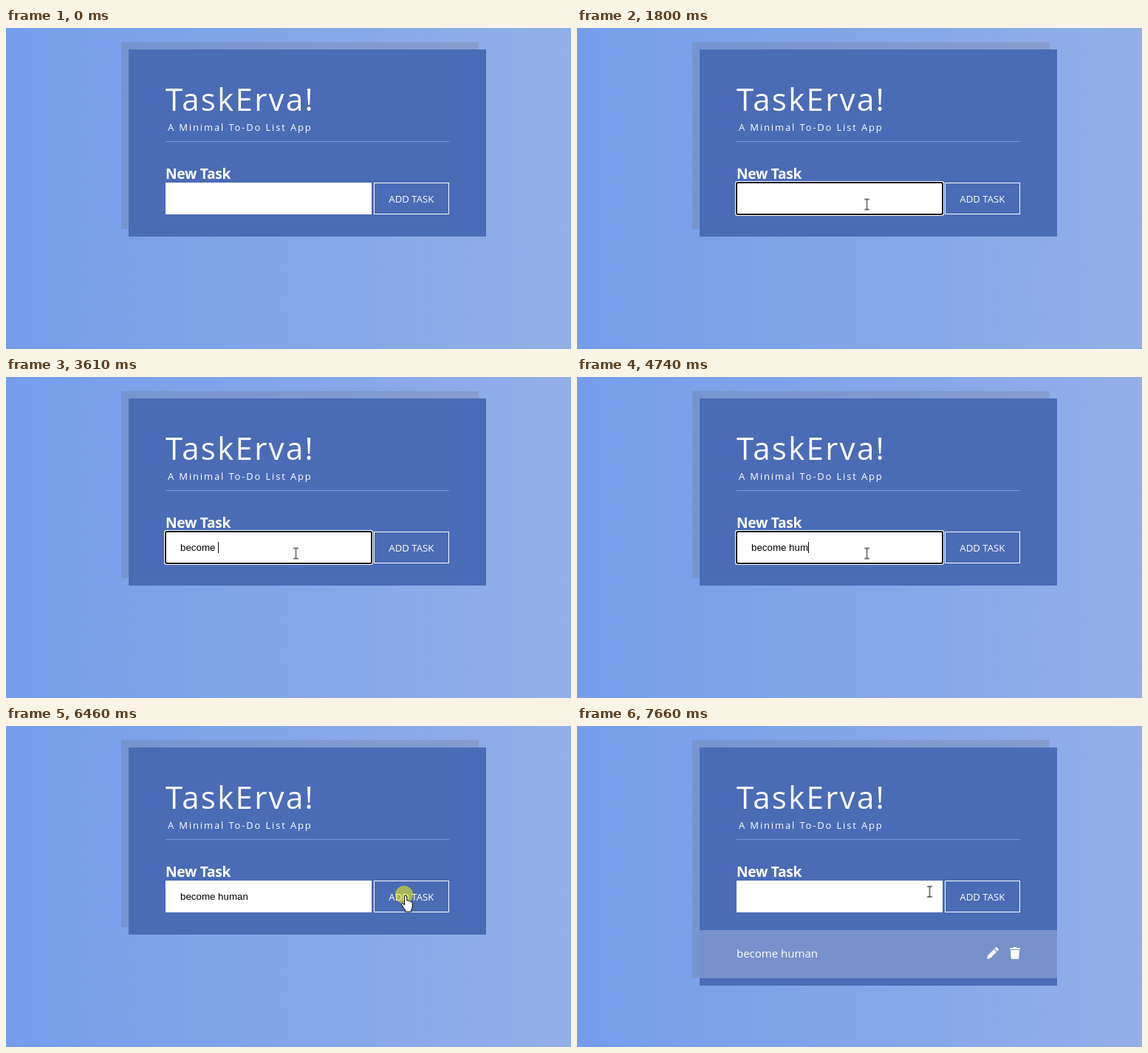
An HTML page for the animation above (8000 ms loop, 765 px wide and 434 px high).

```html
<!DOCTYPE html>
<html lang="en">
<head>
<meta charset="utf-8">
<title>To-do list</title>
<style>
  html, body { margin: 0; width: 100%; height: 100%; overflow: hidden; }
  svg { display: block; width: 765px; height: 434px; background: linear-gradient(to right, #759dea, #92afe7); }
  text { font-family: "Open Sans", "Noto Sans", sans-serif; fill: #fff; }
  .title { font-size: 42px; letter-spacing: 2.3px; }
  .tagline { font-size: 13px; letter-spacing: 1.85px; }
  .label { font-size: 19.2px; font-weight: 700; letter-spacing: -.3px; }
  .button { font-size: 13.2px; }
  .item { font-size: 15px; }
  .typed { font: 13.333px "Liberation Sans", Arial, sans-serif; fill: #000; }

  .focus, .typing, .caret, .added, .pointer, .arrow, .beam, .hand, .click {
    animation: 8s step-end infinite;
  }
  .focus { animation-name: focus; }
  .typing { animation-name: typing; }
  .caret { animation-name: caret; }
  .added { animation-name: added; }
  .pointer { animation-name: move; }
  .arrow { animation-name: arrow; }
  .beam { animation-name: beam; }
  .hand { animation-name: hand; }
  .click { animation-name: click; }

  @keyframes focus { 0%, 80.75% { opacity: 0 } 15% { opacity: 1 } }
  @keyframes added { 0% { opacity: 0 } 82.5%, 100% { opacity: 1 } }
  @keyframes click {
    0%, 16.625%, 82.5%, 100% { opacity: 0 }
    15%, 80.75% { opacity: 1 }
  }
  @keyframes caret {
    0%, 22.5%, 51.75%, 70%, 80.75%, 100% { opacity: 0 }
    15%, 28.25%, 53.375%, 76.625% { opacity: 1 }
  }
  /* the caret pushes a white cover off the text, one letter at a time */
  @keyframes typing {
    0% { transform: translateX(0) }
    28.25% { transform: translateX(7.4px) }
    31.625% { transform: translateX(14.8px) }
    34.125% { transform: translateX(21.5px) }
    36.625% { transform: translateX(28.9px) }
    40.25% { transform: translateX(40px) }
    42.625% { transform: translateX(47.4px) }
    45.125% { transform: translateX(51.1px) }
    53.375% { transform: translateX(58.5px) }
    55.875% { transform: translateX(65.9px) }
    59.25% { transform: translateX(77px) }
    60.875% { transform: translateX(84.4px) }
    63.375% { transform: translateX(92px) }
    82.5%, 100% { transform: translateX(0) }
  }
  @keyframes move {
    0% { transform: translate(679px, 424px) }
    4.125% { transform: translate(679px, 424px); animation-timing-function: ease-out }
    10.875% { transform: translate(392.5px, 238.5px) }
    69.375% { transform: translate(392.5px, 238.5px); animation-timing-function: ease-in }
    73.5% { transform: translate(500px, 235px); animation-timing-function: ease-out }
    76.625% { transform: translate(539px, 228px) }
    92.75% { transform: translate(539px, 228px); animation-timing-function: ease-in-out }
    95.75%, 100% { transform: translate(477.5px, 224px) }
  }
  @keyframes arrow { 0%, 9.5%, 100% { opacity: 0 } 4.125% { opacity: 1 } }
  @keyframes beam { 0%, 73.4% { opacity: 0 } 9.5%, 94.6%, 100% { opacity: 1 } }
  @keyframes hand { 0%, 94.6%, 100% { opacity: 0 } 73.4% { opacity: 1 } }
</style>
</head>
<body>
<svg viewBox="0 0 765 434">
  <!-- card -->
  <path d="M156 19H640V29H166V272H156Z" fill="#646464" fill-opacity=".2"/>
  <rect x="166" y="29" width="484" height="253" fill="#4a6cb6"/>
  <text class="title" x="216" y="112">TaskErva!</text>
  <text class="tagline" x="219" y="139">A Minimal To-Do List App</text>
  <rect x="216" y="153" width="384" height="1" fill="#7599e0"/>

  <!-- form -->
  <text class="label" x="216" y="204">New Task</text>
  <rect x="216" y="209" width="279" height="43" fill="#fff"/>
  <g class="focus">
    <rect x="214" y="207" width="283" height="47" rx="3" fill="#fff"/>
    <rect x="215" y="208" width="281" height="45" rx="3" fill="#101010"/>
    <rect x="217" y="210" width="277" height="41" rx="1" fill="#fff"/>
  </g>
  <text class="typed" x="236" y="235">become human</text>
  <g class="typing">
    <rect x="236" y="220" width="100" height="22" fill="#fff"/>
    <rect class="caret" x="236" y="223" width="1" height="15"/>
  </g>
  <rect x="498.5" y="209.5" width="101" height="42" fill="none" stroke="#fff"/>
  <text class="button" x="518.3" y="236">ADD TASK</text>

  <!-- list -->
  <g class="added">
    <rect x="156" y="272" width="10" height="69" fill="#646464" fill-opacity=".2"/>
    <rect x="166" y="282" width="484" height="69" fill="#4a6cb6"/>
    <rect x="166" y="276" width="484" height="65" fill="#7791cb"/>
    <text class="item" x="216" y="313">become human</text>
    <g fill="#fff">
      <path d="M555 315L555.9 310.4 564.4 301.9 568.1 305.6 559.6 314.1Z"/>
      <path d="M565.3 301L566.7 299.6Q567.8 298.6 568.9 299.6L570.4 301.1Q571.4 302.2 570.4 303.3L569 304.7Z"/>
      <path d="M586 300H590L591 299H595L596 300H600V302H586ZM587 303H599L598.3 313.7Q598.2 315 597 315H589Q587.8 315 587.7 313.7Z"/>
    </g>
  </g>

  <!-- mouse pointer -->
  <g class="pointer">
    <circle class="click" r="12" fill="#ff0" fill-opacity=".5"/>
    <path class="arrow" d="M.5 .5V16.5L4.2 13 6.7 18.6 9 17.6 6.6 12H11.7Z" fill="#fff" stroke="#000"/>
    <path class="beam" d="M-3.5-7H3.5M-3.5 7H3.5M0-7V7" fill="none" stroke="#000"/>
    <path class="hand" d="M.6 3Q.6 1.2 2.2 1.2T3.8 3V8Q5.4 7.2 6.3 8.8Q8 8 8.8 9.6Q11.2 9.2 11.3 11.5V16Q11.2 18.5 9.8 20.5V23H1.6V20.8Q-.6 18.5-3.2 14Q-4 12.2-2.6 11.7Q-1.4 11.4.6 14Z" fill="#fff" stroke="#000" stroke-linejoin="round"/>
  </g>
</svg>
</body>
</html>
```
